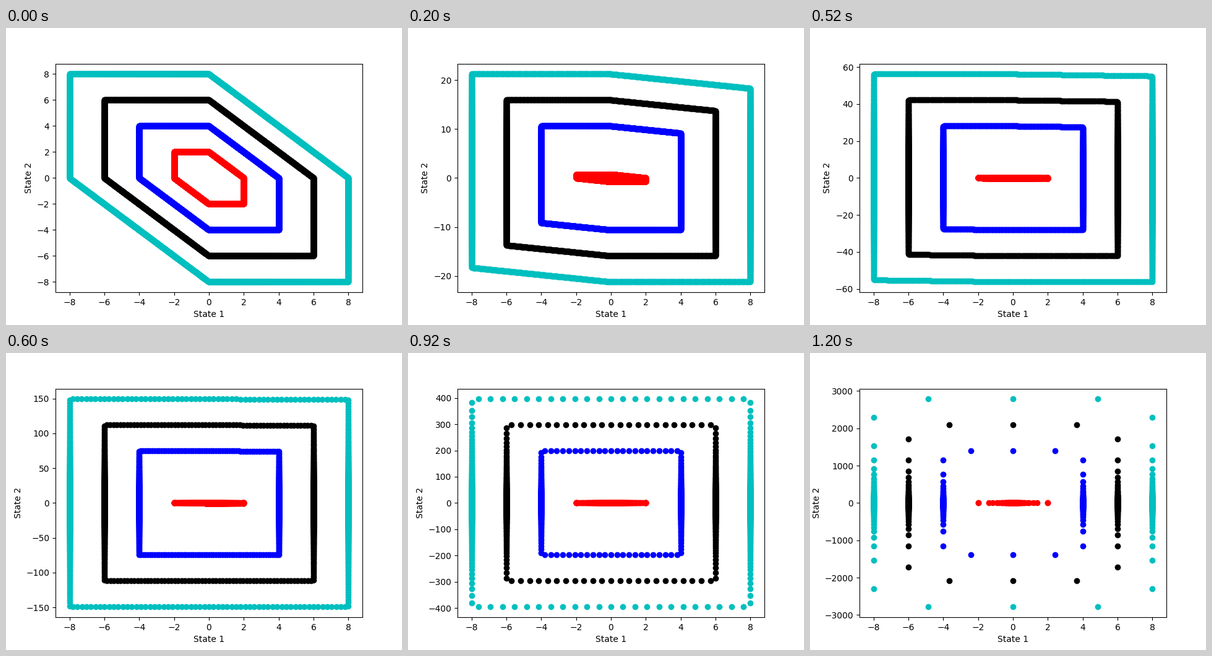
Animation, 640 px wide and 480 px high, one loop 1.4 s. Source, as a matplotlib script:

```python
import numpy as np
import matplotlib.pyplot as plt
from matplotlib.animation import FuncAnimation

FRAMES, INTERVAL = 7, 200
STEP, STEPS_PER_FRAME = 0.03, 33
LEVELS = [(2, "r"), (4, "b"), (6, "k"), (8, "c")]

angles = np.radians(np.arange(3600) / 10)
ux, uy = np.cos(angles), np.sin(angles)

fig, ax = plt.subplots(figsize=(6.4, 4.8), dpi=100)


def boundary(level, y_scale, shear):
    """Boundary of |x|, |y / y_scale|, |shear * x + y| / y_scale <= level."""
    norm = np.max([np.abs(ux),
                   np.abs(uy) / y_scale,
                   np.abs(shear * ux + uy) / y_scale], axis=0)
    radius = level / norm
    return radius * ux, radius * uy


def draw(frame):
    steps = frame * STEPS_PER_FRAME
    growth = (1 + STEP) ** steps
    decay = (1 - STEP) ** steps
    ax.clear()
    for level, color in LEVELS:
        # The innermost set contracts, the outer ones expand.
        y_scale = decay if level == 2 else growth
        ax.plot(*boundary(level, y_scale, decay), color + "o")
    ax.set_xlabel("State 1")
    ax.set_ylabel("State 2")
    return ax.lines


anim = FuncAnimation(fig, draw, frames=FRAMES, interval=INTERVAL,
                     init_func=lambda: [], repeat=True, repeat_delay=0)
plt.show()
```
